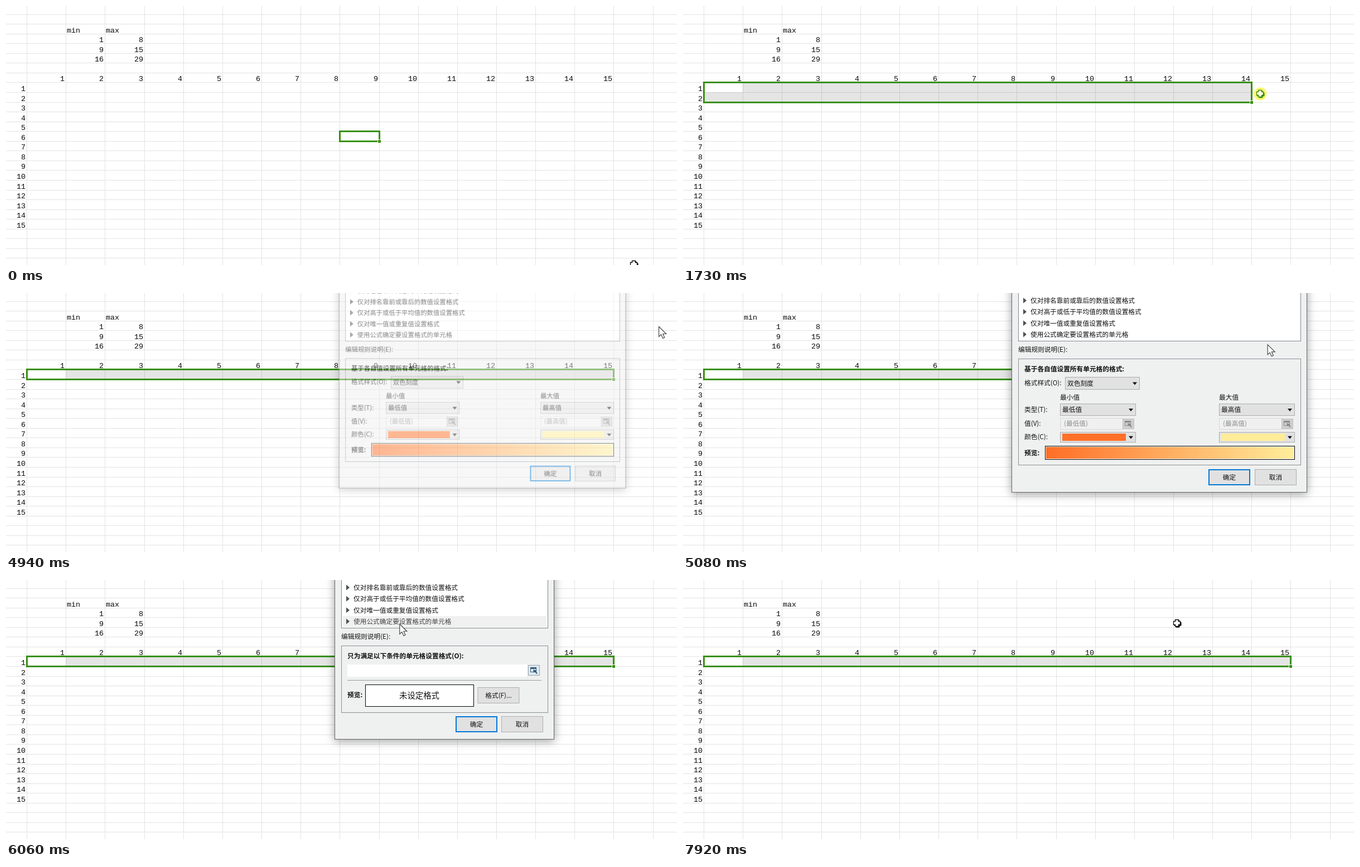
An HTML page with a canvas that plays this animation: 1203 px wide and 466 px high, repeating every 7990 ms.

```html
<!DOCTYPE html>
<html lang="zh">
<head>
<meta charset="utf-8">
<style>
html, body { margin: 0; width: 100%; height: 100%; overflow: hidden; background: #fff; }
canvas { display: block; }
</style>
</head>
<body>
<canvas id="stage" width="1203" height="466"></canvas>
<script>
const W = 1203, H = 466, LOOP = 7990, PAD = 20;
const stage = document.getElementById('stage').getContext('2d');
const layer = document.createElement('canvas');
layer.width = W;
layer.height = H + PAD;
const dlg = layer.getContext('2d');

const MONO = '"Liberation Mono", monospace';
const CJK = '"Noto Sans CJK SC", "Noto Sans CJK", sans-serif';
const GREEN = '#38900f', BLUE = '#0078d7';

// Bursts of movement: start, end, number of steps
const BURSTS = [
  [70, 690, 10], [890, 1660, 12], [1730, 1870, 3], [2270, 2470, 3],
  [3140, 3140, 1], [4740, 4740, 1], [4940, 5710, 12], [5780, 6530, 10],
  [6600, 7370, 12], [7440, 7580, 3], [7720, 7920, 4]
];

// Pointer path: time, x, y
const PATH = [
  [0, 1126, 465], [690, 97, 154], [890, 97, 154], [1170, 535, 164],
  [1660, 1018, 163], [1800, 1052, 153], [1870, 1058, 149], [2270, 1058, 146],
  [2400, 1058, 95], [4930, 1170, 60], [4940, 1170, 60], [5360, 803, 157],
  [5710, 715, 82], [5850, 702, 70], [5990, 702, 70], [6530, 746, 188],
  [7160, 809, 172], [7370, 850, 173], [7580, 941, 160], [7720, 941, 160],
  [7920, 886, 78]
];

function snap(t) {
  let out = 0;
  for (const [a, b, n] of BURSTS) {
    if (t < a) break;
    const gap = n > 1 ? (b - a) / (n - 1) : 1;
    out = Math.min(b, a + Math.floor((t - a) / gap + 1e-6) * gap);
  }
  return out;
}

function pointer(t) {
  let i = 0;
  while (i < PATH.length - 2 && PATH[i + 1][0] <= t) i++;
  const [t0, x0, y0] = PATH[i], [t1, x1, y1] = PATH[i + 1];
  let k = Math.max(0, Math.min(1, (t - t0) / (t1 - t0)));
  if (i === 0) k = k * k * (3 - 2 * k);
  return { x: x0 + (x1 - x0) * k, y: y0 + (y1 - y0) * k };
}

const colX = c => Math.round(37.1 + 70.16 * c);
const rowY = r => Math.round(137.45 + 17.555 * r);
const inside = (p, x, y, x2, y2) => p.x >= x && p.x <= x2 && p.y >= y && p.y <= y2;

function rect(c, x, y, x2, y2, fill) {
  c.fillStyle = fill;
  c.fillRect(x, y, x2 - x, y2 - y);
}

function box(c, x, y, x2, y2, fill, line, w = 1) {
  rect(c, x, y, x2, y2, line);
  rect(c, x + w, y + w, x2 - w, y2 - w, fill);
}

function shape(c, pts, fill, line, w = 1) {
  c.beginPath();
  pts.forEach(([x, y]) => c.lineTo(x, y));
  c.closePath();
  if (fill) { c.fillStyle = fill; c.fill(); }
  if (line) { c.strokeStyle = line; c.lineWidth = w; c.stroke(); }
}

function cell(str, c, r) {
  stage.textAlign = 'right';
  stage.fillText(str, colX(c + 1) - 2, rowY(r + 1) - 2);
}

function sheet() {
  rect(stage, 0, 0, W, H, '#fff');
  for (let c = 0; c < 17; c++) rect(stage, colX(c), 0, colX(c) + 1, H, '#e3e3e3');
  for (let r = -7; r < 19; r++) rect(stage, 0, rowY(r), W, rowY(r) + 1, '#e3e3e3');
  stage.font = '13.4px ' + MONO;
  stage.fillStyle = '#0a0a0a';
  for (let i = 1; i <= 15; i++) {
    cell(i, i - 1, -1);
    cell(i, -1, i - 1);
  }
  [[1, 8], [9, 15], [16, 29]].forEach(([lo, hi], i) => {
    cell(lo, 1, i - 5);
    cell(hi, 2, i - 5);
  });
  stage.textAlign = 'left';
  stage.fillText('min', colX(1) + 2, rowY(-5) - 2);
  stage.fillText('max', colX(2) + 2, rowY(-5) - 2);
}

function selection(t) {
  let c = 8, r = 5, cols = 1, rows = 1;
  if (t >= 890) {
    const p = pointer(Math.max(890, Math.min(t, 1870) - 70));
    c = r = 0;
    cols = Math.floor((p.x - 37.1) / 70.16) + 1;
    rows = p.y > 155 ? 2 : 1;
  }
  const x = colX(c), y = rowY(r), x2 = colX(c + cols), y2 = rowY(r + rows);
  const tint = 'rgba(0,0,0,.1)';
  rect(stage, colX(c + 1), y, x2, rowY(r + 1), tint);
  if (rows > 1) rect(stage, x, rowY(r + 1), x2, y2, tint);
  stage.strokeStyle = GREEN;
  stage.lineWidth = 3;
  stage.strokeRect(x + .5, y + .5, x2 - x, y2 - y);
  rect(stage, x2 - 3, y2 - 3, x2 + 3, y2 + 3, '#fff');
  rect(stage, x2 - 2, y2 - 2, x2 + 3, y2 + 3, GREEN);
}

function tableIcon(x, y, mark) {
  stage.strokeStyle = '#555';
  stage.lineWidth = 1.2;
  stage.strokeRect(x + .5, y + .5, 14, 14);
  stage.beginPath();
  for (const d of [5, 10]) {
    stage.moveTo(x, y + d); stage.lineTo(x + 15, y + d);
    stage.moveTo(x + d, y); stage.lineTo(x + d, y + 15);
  }
  stage.stroke();
  rect(stage, x + 8, y + 8, x + 16, y + 16, '#fff');
  stage.strokeStyle = mark;
  stage.beginPath();
  stage.arc(x + 12, y + 12, 3, 0, 7);
  stage.stroke();
}

function menu() {
  stage.save();
  stage.shadowColor = 'rgba(0,0,0,.3)';
  stage.shadowBlur = 8;
  stage.fillStyle = '#fff';
  stage.beginPath();
  stage.roundRect(1159, -30, 80, 104, 8);
  stage.fill();
  stage.restore();
  tableIcon(1175, 8, '#a4606c');
  tableIcon(1175, 43, '#666');
  label(stage, '清除规则', 1197, 15, { size: 13 });
  label(stage, '管理规则', 1197, 50, { size: 13 });
}

function label(c, str, x, y, o = {}) {
  const size = o.size || 11.7;
  c.font = (o.bold ? 'bold ' : '') + size + 'px ' + CJK;
  c.textAlign = o.align || 'left';
  c.fillStyle = o.color || '#111';
  c.fillText(str, x, y + size * .37);
}

function combo(x, y, x2, y2, str, hot) {
  box(dlg, x, y, x2, y2, hot ? '#e5f1fb' : '#e1e1e1', hot ? BLUE : '#adadad');
  const ax = x2 - 9, ay = (y + y2) / 2;
  shape(dlg, [[ax - 4, ay - 2], [ax + 4, ay - 2], [ax, ay + 3]], '#111');
  if (str) label(dlg, str, x + 4, ay);
}

function button(x, y, str, main) {
  box(dlg, x, y, x + 75, y + 29, '#e1e1e1', main ? BLUE : '#adadad', main ? 2 : 1);
  label(dlg, str, x + 37.5, y + 14.5, { align: 'center' });
}

function picker(x, y, fill, line, ink) {
  box(dlg, x, y, x + 21, y + 19, fill, line);
  dlg.strokeStyle = ink;
  dlg.lineWidth = 1;
  dlg.strokeRect(x + 4.5, y + 4.5, 10, 8);
  rect(dlg, x + 4, y + 4, x + 15, y + 7, ink);
  shape(dlg, [[x + 9, y + 8], [x + 16, y + 10], [x + 14, y + 11], [x + 17, y + 15],
    [x + 15, y + 16], [x + 12, y + 12], [x + 10, y + 14]], ink);
}

function frame(right, bottom, groupBottom, picked) {
  dlg.save();
  dlg.shadowColor = 'rgba(0,0,0,.38)';
  dlg.shadowBlur = 15;
  dlg.shadowOffsetY = 3;
  rect(dlg, 589, -PAD, right, bottom, '#666');
  dlg.restore();
  rect(dlg, 590, -PAD, right - 1, bottom - 1, '#eff0f0');
  const edge = right - 11;
  box(dlg, 601, -PAD - 2, edge, 87, '#fff', '#828790');
  if (picked) rect(dlg, 604, 65, edge - 3, 85, '#f0f0f0');
  ['仅对包含以下内容的单元格设置格式', '仅对排名靠前或靠后的数值设置格式', '仅对高于或低于平均值的数值设置格式',
    '仅对唯一值或重复值设置格式', '使用公式确定要设置格式的单元格'].forEach((s, i) => {
    const y = -7 + 20.4 * i;
    shape(dlg, [[610, y - 5], [616, y], [610, y + 5]], '#505050');
    label(dlg, s, 623, y, { color: picked && i === 4 ? '#444' : '#111' });
  });
  label(dlg, '编辑规则说明(E):', 601, 102);
  box(dlg, 601, 118, edge, groupBottom, '#eff0f0', '#8c9096');
}

function scaleForm(p) {
  frame(1119, 359, 310, false);
  label(dlg, '基于各自值设置所有单元格的格式:', 612, 137, { bold: true });
  label(dlg, '格式样式(O):', 612, 162);
  combo(685, 151, 819, 174, '双色刻度', inside(p, 685, 151, 819, 174));
  label(dlg, '类型(T):', 612, 210);
  label(dlg, '值(V):', 612, 235);
  label(dlg, '颜色(C):', 612, 259);
  [[676, '小', '低', '#ff7128'], [961, '大', '高', '#ffec98']].forEach(([x, size, level, color]) => {
    label(dlg, `最${size}值`, x, 188);
    combo(x, 199, x + 136, 221, `最${level}值`);
    box(dlg, x, 225, x + 113, 246, '#f0f0f0', '#d8d8d8');
    label(dlg, `(最${level}值)`, x + 7, 235, { color: '#8c8c8c' });
    picker(x + 112, 226, '#cfcfcf', '#c0c0c0', '#8a8a8a');
    combo(x, 250, x + 136, 269);
    rect(dlg, x + 4, 253, x + 118, 266, color);
  });
  label(dlg, '预览:', 612, 288, { bold: true });
  box(dlg, 649, 275, 1097, 300, '#fff', '#000');
  const g = dlg.createLinearGradient(651, 0, 1095, 0);
  g.addColorStop(0, '#ff6e26');
  g.addColorStop(1, '#ffee9c');
  rect(dlg, 651, 277, 1095, 298, g);
  button(942, 317, '确定', true);
  button(1025, 317, '取消');
}

function formulaForm(t, p) {
  frame(983, 287, 239, true);
  label(dlg, '只为满足以下条件的单元格设置格式(O):', 612, 137, { bold: true });
  rect(dlg, 612, 152, 934, 174, '#fff');
  if (t >= 6400) {
    dlg.font = '12px "Open Sans", "Noto Sans", sans-serif';
    dlg.textAlign = 'left';
    dlg.fillStyle = '#111';
    dlg.fillText('MN()))>=,INDIRECT(ADDRESS(ROW()-1,COLUMN()))<=)', 615, 167);
    if (t < 6950) rect(dlg, 931, 155, 932, 171, '#111');
  }
  const hot = inside(p, 936, 152, 958, 172);
  picker(936, 153, hot ? '#c4e0f6' : '#dfe9f2', hot ? BLUE : '#9aa4ac', '#345a78');
  rect(dlg, 612, 180, 960, 181, '#9a9a9a');
  label(dlg, '预览:', 612, 207, { bold: true });
  box(dlg, 644, 188, 839, 228, '#fff', '#000');
  label(dlg, '未设定格式', 741, 208, { size: 14.4, align: 'center' });
  button(845.5, 193, '格式(F)...');
  button(806, 245, '确定', true);
  button(888, 245, '取消');
}

function dialogAlpha(t) {
  if (t < 4940 || t >= 7840) return 0;
  if (t < 7720) return Math.min(1, .5 + (t - 4940) / 200);
  return Math.max(0, .6 - (t - 7720) / 180);
}

function dialog(t, p, alpha) {
  const small = t >= 5980;
  dlg.setTransform(1, 0, 0, 1, 0, 0);
  dlg.clearRect(0, 0, W, H + PAD);
  dlg.translate(0, PAD);
  if (small) formulaForm(t, p); else scaleForm(p);
  const k = .943 + .057 * alpha, cx = small ? 786 : 854, cy = 95;
  stage.save();
  stage.globalAlpha = alpha;
  stage.translate(cx, cy);
  stage.scale(k, k);
  stage.drawImage(layer, -cx, -cy - PAD);
  stage.restore();
}

function cross(p, pressed) {
  const { x, y } = p;
  if (pressed) {
    stage.fillStyle = '#fcf76c';
    stage.beginPath();
    stage.arc(x, y, 11.5, 0, 7);
    stage.fill();
  }
  const ink = pressed ? '#348a12' : '#000';
  const plus = (a, b, d) => [[-b, -a], [-b, -b], [b, -b], [b, -a]].flatMap(() => [])
    .concat([[-b, -a], [b, -a], [b, -b], [a, -b], [a, b], [b, b], [b, a], [-b, a],
      [-b, b], [-a, b], [-a, -b], [-b, -b]].map(([u, v]) => [x + u + d, y + v + d]));
  shape(stage, plus(6, 3, 1), ink, ink);
  shape(stage, plus(6, 3, -.5), pressed ? '#fffde0' : '#fff', ink, 1.3);
}

function arrow({ x, y }) {
  const pts = [[0, 0], [0, 18], [4, 14.3], [7.2, 21], [10.2, 19.7], [7.2, 13], [13, 13]];
  shape(stage, pts.map(([u, v]) => [x + u + .5, y + v + .5]), '#fff', '#444', 1.2);
}

function beam({ x, y }) {
  x = Math.round(x);
  y = Math.round(y);
  rect(stage, x - 1, y - 8, x + 1, y + 8, '#777');
  rect(stage, x - 4, y - 9, x + 4, y - 7, '#777');
  rect(stage, x - 4, y + 7, x + 4, y + 9, '#777');
}

function draw(t) {
  const p = pointer(t), alpha = dialogAlpha(t);
  sheet();
  selection(t);
  if (t >= 3140 && t < 4740) menu();
  if (alpha > 0) dialog(t, p, alpha);
  if (t < 2465 || t >= 7840) cross(p, t >= 890 && t < 2270);
  else if (t >= 4940) {
    if (t >= 5980 && inside(p, 612, 152, 934, 174)) beam(p);
    else arrow(p);
  }
}

function tick() {
  draw(snap(performance.now() % LOOP));
  requestAnimationFrame(tick);
}
tick();
</script>
</body>
</html>
```
